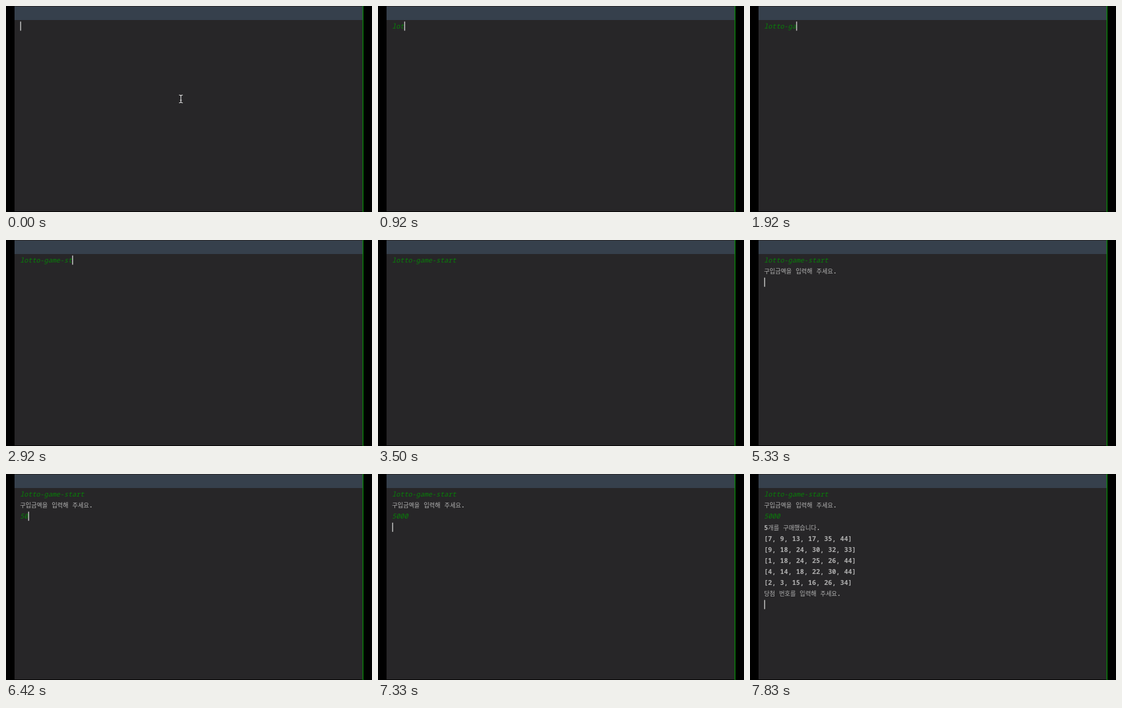
An HTML page with a canvas that plays this animation: 600 by 338 pixels, repeating every 8 s.

```html
<!DOCTYPE html>
<html lang="ko">
<head>
<meta charset="utf-8">
<style>
  html, body { margin: 0; height: 100%; overflow: hidden; background: #000; }
  canvas { display: block; }
</style>
</head>
<body>
<canvas id="stage" width="600" height="338"></canvas>
<script>
const ctx = document.getElementById('stage').getContext('2d');
const LOOP = 8000, LEFT = 23, TOP = 33, ROW = 18.12;
const GREEN = '#088008', GREY = '#b0b0b0';

// Console output, appended at the given time
const output = [
  [80, 'l'], [420, 'o'], [920, 't'], [1000, 't'], [1080, 'o'],
  [1750, '-'], [1920, 'ga'], [2000, 'm'], [2080, 'e'],
  [2670, '-'], [2750, 's'], [2920, 't'], [3000, 'a'], [3080, 'r'], [3170, 't'],
  [5170, '\n'], [5330, '구입금액을 입력해 주세요.\n'],
  [6330, '5'], [6420, '0'], [6580, '0'], [6670, '0'], [7000, '\n'],
  [7580, `5개를 구매했습니다.
[7, 9, 13, 17, 35, 44]
[9, 18, 24, 30, 32, 33]
[1, 18, 24, 25, 26, 44]
[4, 14, 18, 22, 30, 44]
[2, 3, 15, 16, 26, 34]
당첨 번호를 입력해 주세요.
`],
];
const inputRows = [0, 2];
const caretOff = [[1500, 1750], [3500, 4000], [4500, 5000], [5830, 6170]];

function rect(color, x, y, w, h) {
  ctx.fillStyle = color;
  ctx.fillRect(x, y, w, h);
}

// Draws one line and returns the x position after it
function drawLine(text, row) {
  const typed = inputRows.includes(row);
  let x = LEFT;
  ctx.fillStyle = typed ? GREEN : GREY;
  for (const run of text.match(/[가-힣]+|[^가-힣]+/g) || []) {
    const hangul = /[가-힣]/.test(run);
    ctx.font = hangul ? '500 9.9px "Noto Sans CJK KR", "Noto Sans CJK", sans-serif'
      : `${typed ? 'italic 400' : '600'} 10.95px "Noto Sans Mono", monospace`;
    ctx.fillText(run, x, TOP + 4.2 + row * ROW);
    x += ctx.measureText(run).width;
  }
  return x;
}

function drawPointer(x, y) {
  ctx.strokeStyle = '#d8d8d8';
  ctx.lineWidth = 1.2;
  ctx.beginPath();
  for (const s of [-1, 1]) {
    ctx.moveTo(x - 3, y + s * 6.3);
    ctx.quadraticCurveTo(x, y + s * 6.3, x, y + s * 4.5);
    ctx.quadraticCurveTo(x, y + s * 6.3, x + 3, y + s * 6.3);
  }
  ctx.moveTo(x, y - 5);
  ctx.lineTo(x, y + 5);
  ctx.moveTo(x - 1.5, y + 2);
  ctx.lineTo(x + 1.5, y + 2);
  ctx.stroke();
}

function draw(t) {
  rect('#000', 0, 0, 600, 338);
  rect('#272628', 14, 0, 571, 337);
  rect('#36404c', 14, 1, 571, 22);
  rect('#088408', 584.6, 0, 1.4, 338);

  const lines = output.filter(([at]) => at <= t).map(([, text]) => text).join('').split('\n');
  const ends = lines.map(drawLine);
  const row = lines.length - 1;
  if (!caretOff.some(([from, to]) => t >= from && t < to))
    rect('#c8c8c8', ends[row] + 0.2, TOP - 7.5 + row * ROW, 1.5, 15);
  if (t < 80) drawPointer(286.7, 152.5);
}

const start = performance.now();
function frame() {
  draw((performance.now() - start) % LOOP);
  requestAnimationFrame(frame);
}
frame();
</script>
</body>
</html>
```
